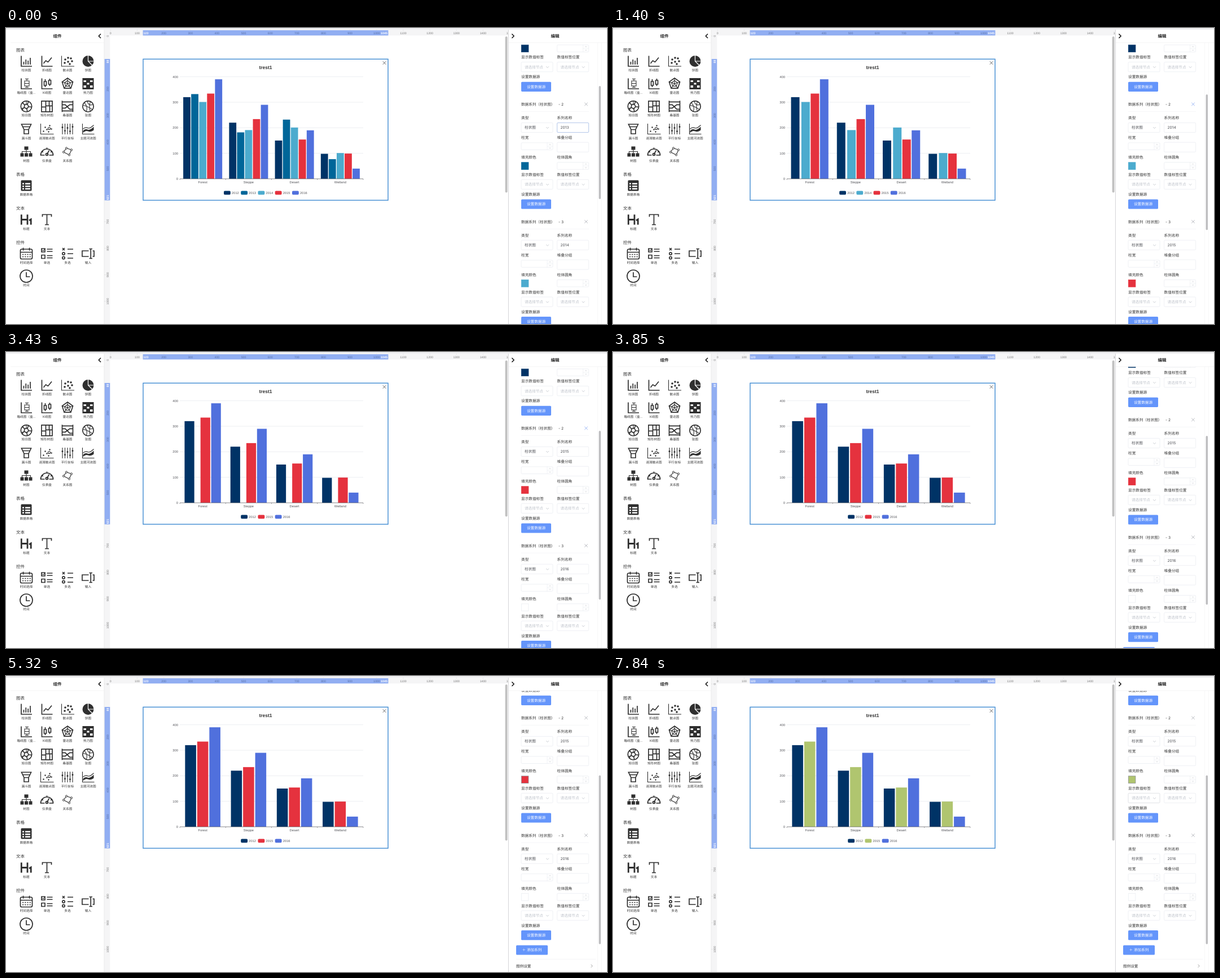
Write an HTML page that moves like this. It is 1065x526 px and loops after 8000 ms.

```html
<!DOCTYPE html>
<html lang="zh">
<head>
<meta charset="utf-8">
<title>图表编辑器</title>
<style>
html, body { margin: 0; width: 100%; height: 100%; overflow: hidden; background: #fff; }
svg { display: block; width: 1065px; height: 526px; }
text { font-family: Inter, "Noto Sans CJK SC", sans-serif; text-rendering: geometricPrecision; }
.lat { font-family: "Liberation Sans", "Noto Sans CJK SC", sans-serif; }
.ico { fill: none; stroke: #2f2f2f; stroke-width: 1.7; }
.ico .f { fill: #2f2f2f; stroke: none; }
.ico .w { fill: #fff; stroke: none; }
.ico .t { stroke-width: 1.1; }
</style>
</head>
<body>
<svg id="stage" viewBox="0 0 1065 526"></svg>
<script>
const LOOP = 8000;
const $ = id => document.getElementById(id);

// markup helpers
const text = (x, y, s, size, fill = '#333', extra = '') =>
  `<text x="${x}" y="${y + size * .37}" font-size="${size}" fill="${fill}" ${extra}>${s}</text>`;
const rect = (x, y, w, h, fill, extra = '') =>
  `<rect x="${x}" y="${y}" width="${w}" height="${h}" fill="${fill}" ${extra}/>`;
const path = (d, stroke, w = .6, extra = '') =>
  `<path d="${d}" fill="none" stroke="${stroke}" stroke-width="${w}" ${extra}/>`;
const box = (x, y, w, h, extra = '') =>
  rect(x, y, w, h, '#fff', `rx="1.6" stroke="#e3e6ec" stroke-width=".6" ${extra}`);
const dots = (r, ...pts) =>
  pts.map(([x, y]) => `<circle class="f" cx="${x}" cy="${y}" r="${r}"/>`).join('');
const p = (d, c = '') => `<path class="${c}" d="${d}"/>`;
const circ = (r, x = 0, y = 0, c = '') => `<circle class="${c}" cx="${x}" cy="${y}" r="${r}"/>`;
const polar = (r, deg) => {
  const a = (deg - 90) * Math.PI / 180;
  return `${(r * Math.cos(a)).toFixed(2)} ${(r * Math.sin(a)).toFixed(2)}`;
};
const ring = (r, n) => 'M' + [...Array(n).keys()].map(i => polar(r, i * 360 / n)).join('L') + 'Z';
const rays = (r0, r1, n, off = 0) =>
  [...Array(n).keys()].map(i => `M${polar(r0, off + i * 360 / n)}L${polar(r1, off + i * 360 / n)}`).join('');

const axes = p('M-9-9.5V9H10');
const icons = {
  bar: axes + p('M-4.5 6V1M-.7 6V-3M3.2 6V-1M7 6V-6'),
  line: axes + p('M-6 4L-2-1L2 1.5L8.5-6.5'),
  scatter: p('M-10.5-9.5V9H12', 't') + dots(1.8, [-5, 3], [-4, -3], [1, -6], [1, 1], [6, -5], [8, 0], [4, 5]),
  pie: circ(10, 0, 0, 'f') + '<path d="M0-10V0L7.5 7.5M0 0H10" stroke="#fff" stroke-width="1.2"/>',
  box: axes + p('M-3-5H5V4H-3ZM-3-.5H5M1-5V-8.5M1 4V6.5M-2-8.5H4M-2 6.5H4', 't'),
  candle: axes + p('M-5-4H-1V3H-5ZM3-6H7V1H3ZM-3-8V-4M-3 3V6M5-9V-6M5 1V4'),
  radar: p(ring(10, 5)) + p(ring(5.5, 5), 't') + p(rays(0, 10, 5), 't'),
  heat: rect(-10, -10, 20, 20, '#2f2f2f', 'stroke="none"') +
    p('M-8-6h4.5v3h-4.5zM3.5-6h4.5v3h-4.5zM-2-1.5h4v3h-4zM3.5 3h4.5v4h-4.5zM-8 3h4.5v4h-4.5z', 'w'),
  sun: circ(9.7) + circ(3.6) + p(rays(3.6, 9.7, 5, 25)) + p('M-5 4L-8 7M0-9V-4', 't'),
  tree: p('M-9.5-9.5H9.5V9.5H-9.5ZM-2-9.5V9.5M-9.5 1H-2M-2-1H9.5M4-9.5V-1M5 -1V9.5'),
  sankey: p('M-9.5-10V10M9.5-10V10M-9.5-8H9.5M-9.5-3H-4L4 5H9.5M-9.5 3H-4L4-3H9.5M-9.5 8H9.5'),
  chord: circ(9.7) + p('M-7-7Q0 0-3 9M-1-9.5Q-1-1 9-3M8 6Q0 0-9-2M4-9Q1 1 4 9', 't'),
  funnel: p('M-8.5-8.5H8.5L4 1H-4ZM-4 1V8.5H4V1M-6-4H6'),
  ripple: p('M-11-9.5V9H12', 't') + dots(1.2, [-6, 4], [-3, -3], [0, 1], [5, -6], [8, 0], [3, 5]) + circ(2, 4, -1, 't'),
  para: p('M-9-9.5V9.5M-4.5-9.5V9.5M0-9.5V9.5M4.5-9.5V9.5M9-9.5V9.5', 't') +
    dots(1.5, [-9, -3], [-4.5, 3], [0, -2], [4.5, 4], [9, -4]),
  river: p('M-10-9.5V9H11', 't') + p('M-9 3Q-5-1-1 1T10-4V2Q5 6 0 4T-9 7Z', 'f') + p('M-9 0Q-5-4-1-2T10-7', 't'),
  org: p('M-3.5-9h7v6h-7zM-10.5 3h6v6h-6zM-3 3h6v6h-6zM4.5 3h6v6h-6z', 'f') + p('M0-4V4M-7.5 4V0H7.5V4', 't'),
  gauge: p('M-9.5 6.5H-11A11 11 0 1 1 11 6.5H4M-4 6.5H-10M0 5L4-2M-6.5 1L-9 0M0-7V-4.5M6.5 1L9 0') + circ(2, 0, 5),
  graph: p('M-7 1L-2-6L7-3L3 6Z', 't') + [[-7, 1], [-2, -6], [7, -3], [3, 6]].map(q =>
    `<circle cx="${q[0]}" cy="${q[1]}" r="1.6" fill="#fff" stroke-width="1"/>`).join(''),
  table: rect(-9.5, -9.5, 19, 19, '#2f2f2f', 'rx="1.5" stroke="none"') +
    p('M-7-4.5h3v2.5h-3zM-2-4.5h9v2.5h-9zM-7 0h3v2.5h-3zM-2 0h9v2.5h-9zM-7 4.5h3v2.5h-3zM-2 4.5h9v2.5h-9z', 'w'),
  h1: '<path d="M-8.7-9V9M2-9V9M-8.7 0H2M5 1.5L8.2-.5V9" stroke-width="2.8"/>',
  t: p('M-8-5V-9H8V-5M0-9V9M-3.5 9H3.5'),
  date: '<rect x="-10.5" y="-8" width="21" height="17.5" rx="2.5"/>' + p('M-10-2.5H10M-5.5-10.5V-5.5M5.5-10.5V-5.5') +
    '<path d="M-7 1.5H8M-7 5.5H8" stroke-dasharray="2.2 2"/>',
  radio: p('M-9.5-9h6v6h-6zM-9.5 2.5h6v6h-6zM0-8H10M0-4H10M0 3.5H10M0 7.5H10') + p('M-8-6.5L-6.5-5L-3-9', 't'),
  check: p('M-9-10L-5-6M-5-10L-9-6M0-8H10M0 0H10M0 8H10') + circ(2.2, -7, 0) + circ(2.2, -7, 7.5),
  input: p('M1-5H-10.5V5H1M8-5H10.5V5H8M2-8.5H7.5M4.7-8.5V8.5M2 8.5H7.5'),
  clock: circ(11) + p('M0-7V1H6.5')
};

const menu = [
  [59, 'bar 柱状图 line 折线图 scatter 散点图 pie 饼图'],
  [99, 'box 箱线图（盒... candle K线图 radar 雷达图 heat 热力图'],
  [139.3, 'sun 旭日图 tree 矩形树图 sankey 桑基图 chord 弦图'],
  [179.5, 'funnel 漏斗图 ripple 涟漪散点图 para 平行坐标 river 主题河流图'],
  [219.5, 'org 树图 gauge 仪表盘 graph 关系图'],
  [280, 'table 数据表格'],
  [340.5, 'h1 标题 t 文本'],
  [401, 'date 时间选择 radio 单选 check 多选 input 输入'],
  [441, 'clock 时间']
];

function leftPanel() {
  let s = rect(0, 3, 173.5, 523, '#fff') + path('M8 26H173.5', '#efefef') + path('M174 3V526', '#e2e2e4', .8) +
    text(91, 14.3, '组件', 7.5, '#222', 'text-anchor="middle" font-weight="600"') +
    path('M168 10.5L164.3 14.3L168 18.1', '#111', 1.5);
  [['图表', 39], ['表格', 260], ['文本', 320.5], ['控件', 381]].forEach(([n, y]) => s += text(18, y, n, 7.5));
  for (const [y, row] of menu) {
    const w = row.split(' ');
    for (let i = 0; i < w.length; i += 2) {
      const x = 36 + 18.25 * i;
      s += `<g class="ico" transform="translate(${x} ${y})">${icons[w[i]]}</g>` +
        text(i ? x : x - 0, y + 16, w[i + 1], 5.65, '#333', 'text-anchor="middle"');
    }
  }
  return s;
}

function rulers() {
  const blue = '#91aef2';
  let s = rect(174.5, 3, 715.5, 10.3, '#f5f5f6') + rect(174.5, 3, 9.8, 523, '#f5f5f6') +
    rect(242.6, 4, 434.8, 9.3, blue) + rect(174.5, 55, 9.8, 251.3, blue);
  const mid = 'class="lat" text-anchor="middle"';
  const up = (y, v, fill, extra = '') =>
    `<g transform="translate(179.8 ${y}) rotate(-90)">${text(0, 0, v, 5.2, fill, mid + extra)}</g>`;
  for (let i = 0; i <= 15; i++) {
    const x = 185.3 + i * 47.15, hot = x > 243 && x < 650;
    s += path(`M${x} 3V4.6`, '#ccc', .5);
    if (i !== 10) s += text(x, 8.8, i * 100, 5.2, hot ? '#566fa8' : '#777', mid);
    else s += text(x, 8.8, 1000, 5.2, '#566fa8', mid);
  }
  for (let i = 0; i <= 10; i++) {
    const y = 14.2 + i * 47.15;
    s += path(`M174.5 ${y}H176.3`, '#bbb', .5);
    if (i !== 1 && i !== 6) s += up(y, i * 100, i > 0 && i < 6 ? '#566fa8' : '#777');
  }
  const bold = ' font-weight="700"';
  return s + text(248, 9, 123, 5.3, '#fff', mid + bold) + text(670, 9, 1045, 5.3, '#fff', mid + bold) +
    up(59.5, 88, '#fff', bold) + up(301, 621, '#fff', bold) +
    rect(884.6, 15, 4, 277.5, '#c1c1c1', 'rx="2"');
}

// chart data
const series = [
  { name: 2012, color: '#003366', v: [320, 220, 150, 98] },
  { name: 2013, color: '#006699', v: [332, 182, 232, 77] },
  { name: 2014, color: '#4cabce', v: [301, 191, 201, 101] },
  { name: 2015, color: '#e5323e', v: [334, 234, 154, 99] },
  { name: 2016, color: '#5070dd', v: [390, 290, 190, 40] }
];
const GREEN = '#b0c56f', BASE = 268, UNIT = .4535, LEFT = 308, CAT = 81.25;

function chart() {
  let s = rect(243, 55.3, 434, 250.8, '#fff', 'stroke="#3f8bd2" stroke-width="1.4"') +
    path('M667.7 59.2L673.3 64.8M673.3 59.2L667.7 64.8', '#444', .8) +
    text(460, 69.6, 'trest1', 8.5, '#333', 'class="lat" font-weight="700" text-anchor="middle"');
  for (let v = 0; v <= 400; v += 100) {
    const y = BASE - v * UNIT;
    if (v) s += path(`M308 ${y}H633`, '#dfe2e8', .55);
    s += text(305, y, v, 5.8, '#54555a', 'class="lat" text-anchor="end"');
  }
  s += '<g id="bars"></g>' + path('M308 268H633', '#54555a', .7);
  for (let i = 0; i <= 4; i++) s += path(`M${LEFT + CAT * i} 268v2`, '#54555a', .5);
  ['Forest', 'Steppe', 'Desert', 'Wetland'].forEach((n, i) =>
    s += text(LEFT + CAT * (i + .5), 274.3, n, 5.8, '#54555a', 'class="lat" text-anchor="middle"'));
  return s + '<g id="legend"></g>';
}

const chevron = (x, y, r = 2.4, dir = 1) =>
  path(`M${x - r} ${y - dir * r / 2}L${x} ${y + dir * r / 2}L${x + r} ${y - dir * r / 2}`, '#b4b8c0', .7);
const select = (x, y, label, fill, extra) =>
  box(x, y - 8.6, 56, 17.2, extra) + text(x + 6, y, label, 6.6, fill) + chevron(x + 46.5, y + .3);
const spinner = (x, y) =>
  box(x, y - 6.3, 56, 12.6) + path(`M${x + 46} ${y - 6.3}v12.6M${x + 46} ${y}h10`, '#e3e6ec', .5) +
  chevron(x + 51, y - 3.1, 1.2, -1) + chevron(x + 51, y + 3.1, 1.2);
const button = (x, y, w, label) =>
  rect(x, y - 8.6, w, 17.2, '#6495fb', 'rx="1.6"') +
  text(x + w / 2, y, label, 6.6, '#fff', 'text-anchor="middle"');

function block(i) {
  const L = 913, R = 976.6, grey = '#bfc3cb', y = 135.4 + (i - 1) * 208.7;
  const labels = (dy, a, b = '') => text(L, y + dy, a, 6.65) + text(R, y + dy, b, 6.65);
  return text(L, y, '数据系列（柱状图）', 6.6) + text(979, y, `- ${i + 1}`, 6.6) +
    `<path id="x${i}" d="M1025.2 ${y - 2.8}l5.6 5.6m0-5.6l-5.6 5.6" fill="none" stroke="#a3a6ad" stroke-width=".75"/>` +
    path(`M913 ${y + 13}H1033`, '#eceef2') + labels(24.2, '类型', '系列名称') +
    select(L, y + 41.6, '柱状图', '#4a4c52') + box(R, y + 33, 56, 17.2, `id="in${i}"`) +
    text(982.6, y + 41.6, '', 6.6, '#4a4c52', `id="name${i}"`) +
    labels(59.2, '柱宽', '堆叠分组') + spinner(L, y + 74.8) + box(R, y + 67.8, 56, 17.2) +
    labels(94.1, '填充颜色', '柱体圆角') +
    rect(913.3, y + 103.4, 12.6, 12.6, '#fff', `id="sw${i}" stroke-width=".8"`) + spinner(R, y + 109.6) +
    labels(125.2, '显示数值标签', '数值标签位置') +
    select(L, y + 142.5, '请选择节点', grey, `id="sel${i}"`) + select(R, y + 142.5, '请选择节点', grey) +
    labels(160, '设置数据源') + button(L, y + 177.6, 53, '设置数据源');
}

function rightPanel() {
  return rect(890, 3, 175, 523, '#fff') + path('M890.4 3V526', '#cfcfd2', .9) + path('M891 26H1065', '#ececee') +
    text(973, 14.3, '编辑', 7.5, '#222', 'text-anchor="middle" font-weight="600"') +
    path('M896.4 10.5L900.1 14.3L896.4 18.1', '#111', 1.5) +
    path('M1048.6 26V526M1055.3 26V526', '#f0f0f1') +
    '<g clip-path="url(#view)"><g id="scroll">' + block(0) + block(1) + block(2) +
    button(904, 548, 56, '＋ 添加系列') + path('M904 564.2H1045M904 587H1045', '#ececee') +
    text(904, 576.2, '图例设置', 6.6) + path('M1036.6 573.7L1039.2 576.3L1036.6 578.9', '#777', .7) +
    '</g></g>' + rect(1050.6, 103, 3.4, 201, '#bdbdbf', 'id="thumb" rx="1.7"');
}

const mix = (hex, to, k) => '#' + [1, 3, 5].map(i =>
  Math.round(parseInt(hex.substr(i, 2), 16) * k + to * (1 - k)).toString(16).padStart(2, '0')).join('');

function picker() {
  const greys = '#333333 #666666 #999999 #adadad #cccccc #dadada #e9e9e9 #f1f1f1 #f6f6f6 #ffffff'.split(' ');
  const base = `#ec7f7f #e6b755 #6c9ef0 #79c580 #67c0c3 #df80cc ${GREEN} #6883d8 #c9806f #a78be0`.split(' ');
  const rows = [greys, base];
  [.14, .33, .58].forEach(k => rows.push(base.map(c => mix(c, 255, k))));
  [.72, .36].forEach(k => rows.push(base.map(c => mix(c, 20, k))));
  let s = rect(852.4, 197.5, 134.4, 166.3, '#fff',
    'rx="2" stroke="#e6e8ec" stroke-width=".6" style="filter:drop-shadow(0 1px 3px rgba(0,0,0,.13))"') +
    path('M860.8 216L868.8 208', '#e05560', .9) + text(872.2, 212, '无填充色', 5.8, '#666');
  rows.forEach((row, r) => row.forEach((c, i) =>
    s += rect(860.4 + 12.28 * i, 226.3 + 12.28 * r, 8.4, 8.4, c, 'rx=".8" stroke="#0001" stroke-width=".4"')));
  return s + text(860, 320.4, '最近使用自定义颜色', 5.65, '#666') + text(860, 333, '暂无', 5.65, '#aaa') +
    path('M852.6 343.6H986.6', '#e8eaee') + path('M867 354.5a3.4 3.4 0 1 0-3 2.2q1-1 0-2h2z', '#777', .6) +
    dots(.5, [862.5, 353], [864, 351.8], [865.6, 352.6]) +
    text(871.4, 353.6, '自定义颜色', 5.75, '#444') + path('M974.4 351.2L976.8 353.6L974.4 356', '#888', .7);
}

$('stage').innerHTML = '<defs><clipPath id="view"><path d="M891 26.5H1048V526H891Z"/></clipPath></defs>' +
  rect(0, 0, 1065, 526, '#fff') + rect(0, 0, 1065, 3, '#efeff1') + rulers() + leftPanel() + chart() +
  rightPanel() + `<g id="picker">${picker()}</g>`;

// timing
const clamp = v => Math.max(0, Math.min(1, v));
const ease = u => u < .5 ? 4 * u ** 3 : 1 - 4 * (1 - u) ** 3;
const step = (t, pairs, v) => pairs.reduce((a, [at, b]) => t >= at ? b : a, v);
const set = (id, k, v) => $(id).setAttribute(k, v);

function slot(n, i) {
  const span = CAT * (.65 + .04 * n), w = span / (n + .1 * (n - 1));
  return [(CAT - span) / 2 + i * w * 1.1, w];
}
const layouts = [[0, 1, 2, 3, 4], [0, 2, 3, 4], [0, 3, 4]];
const CUTS = [1060, 3190];

function drawChart(t, colors) {
  const stage = CUTS.filter(c => t >= c).length;
  const now = layouts[stage], old = layouts[Math.max(0, stage - 1)];
  const since = stage ? t - CUTS[stage - 1] : 1e4;
  const k = ease(clamp(since / 500));
  let s = '';
  for (const id of old) {
    const kept = now.indexOf(id), from = slot(old.length, old.indexOf(id));
    const to = kept < 0 ? from : slot(now.length, kept);
    const fade = kept < 0 ? (1 - clamp(since / 200)) ** 3 : 1;
    if (!fade) continue;
    const [x, w] = from.map((a, i) => a + (to[i] - a) * k);
    series[id].v.forEach((v, c) =>
      s += rect(LEFT + CAT * c + x, BASE - v * UNIT, w, v * UNIT, colors[id], `opacity="${fade}"`));
  }
  $('bars').innerHTML = s;
  const start = 461.6 - now.length * 15.12;
  $('legend').innerHTML = now.map((id, i) => {
    const x = start + i * 30.25;
    return rect(x, 289.6, 11.8, 6.6, colors[id], 'rx="1.7"') +
      text(x + 14.1, 293, series[id].name, 5.7, '#54555a', 'class="lat"');
  }).join('');
}

function draw(t) {
  const colors = series.map(s => s.color);
  if (t >= 6860) colors[3] = GREEN;
  drawChart(t, colors);

  const n = step(t, [[1050, 1], [3150, 2]], 0);
  for (let i = 0; i < 3; i++) {
    const id = layouts[n][i], fill = id === 4 ? '#fff' : colors[id];
    $('name' + i).textContent = series[id].name;
    set('sw' + i, 'fill', fill);
    set('sw' + i, 'stroke', id === 4 ? '#eceef2' : fill);
  }
  if (step(t, [[5320, 1], [6510, 0], [7140, 1]], 0)) set('sw1', 'stroke', '#8a8d94');
  set('in1', 'stroke', step(t, [[140, '#b3c5ea'], [210, '#e3e6ec']], '#7f9edb'));
  set('x1', 'stroke', step(t, [[420, '#7da0f2'], [1960, '#a3a6ad'], [3010, '#7da0f2'], [3850, '#a3a6ad']], '#a3a6ad'));
  set('sel1', 'stroke', step(t, [[7770, '#d6d9e0'], [7840, '#cbced6']], '#e3e6ec'));

  const y = step(t, [[3850, 15], [3920, 27], [4130, 34], [4340, 50], [4410, 61]], 0);
  set('scroll', 'transform', `translate(0 ${-y})`);
  set('thumb', 'y', [103, 118, 140][n] + y * .6);
  set('thumb', 'height', [201, 241, 300][n]);

  const show = t < 6850 ? clamp((t - 5410) / 250) : 1 - clamp((t - 6800) / 200);
  set('picker', 'opacity', show);
  set('picker', 'visibility', show ? 'visible' : 'hidden');
}

const t0 = performance.now();
function tick() {
  draw((performance.now() - t0) % LOOP);
  requestAnimationFrame(tick);
}
tick();
</script>
</body>
</html>
```
